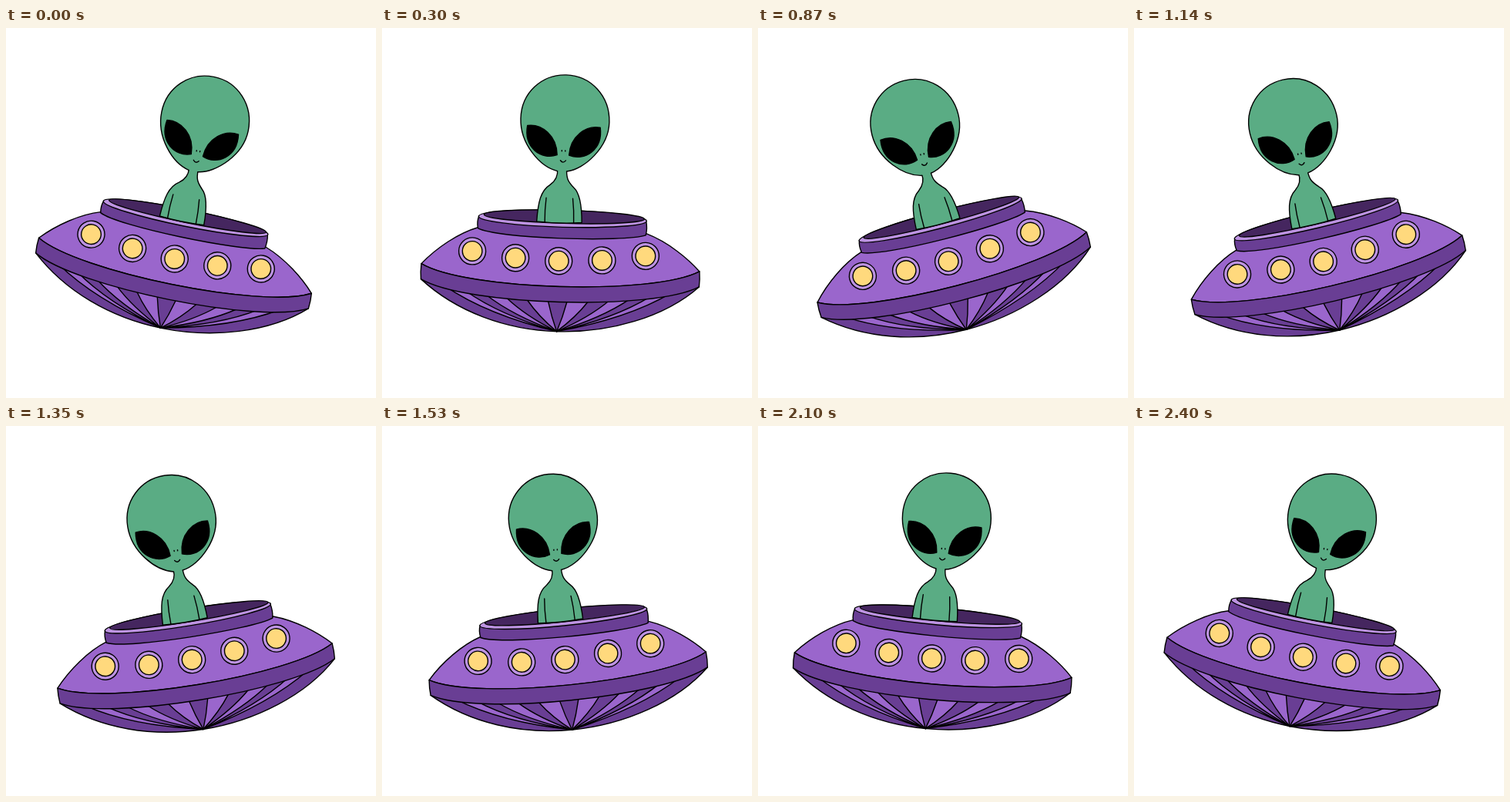
These frames come from a looping animation (480 px wide and 480 px high, 2.43 s). An HTML page:

```html
<!DOCTYPE html>
<html lang="en">
<head>
<meta charset="utf-8">
<title>Rocking saucer</title>
<style>
  html, body { margin: 0; height: 100%; overflow: hidden; background: #fff; }
  svg { display: block; width: 100vw; height: 100vh; }
  #ship { stroke: #000; stroke-width: 1.4; stroke-linejoin: round; stroke-linecap: round; }
  .light { fill: #9a66cc; }
  .dark { fill: #693e94; }
  .pale { fill: #bd93e2; }
  .skin { fill: #5aac84; }
  .line { fill: none; }
</style>
</head>
<body>
<svg viewBox="0 0 480 480">
  <g id="ship">
    <!-- underside -->
    <path class="dark" d="M53 331C100 372 165 394 232 394S370 372 414 331Z"/>
    <g id="stripes" class="light"></g>

    <!-- hull -->
    <path class="light" d="M125 262C100 270 72 290 53 311C112 344 355 344 414 311C398 294 372 274 344 264Z"/>
    <path class="dark" d="M53 311C112 344 355 344 414 311Q415 321 414 331C355 364 112 364 53 331Q52 321 53 311Z"/>
    <g id="windows"></g>

    <!-- collar and opening -->
    <path class="dark" d="M126 247C124 252 124 258 125 263C150 276 315 276 343 266Q345 257 343 248Z"/>
    <ellipse class="pale" cx="234.500" cy="247.500" rx="109" ry="11"/>
    <ellipse fill="#45265f" cx="236.500" cy="245" rx="104" ry="8.500"/>

    <!-- alien -->
    <path class="skin" d="M226 184C227 192 225 198 217 204C205 212 202 227 201 252Q230 254.500 259.500 252C259 230 256 214 248 207C240 199 238 195 238 184Z"/>
    <path class="line" d="M212.500 221Q211 236 211.500 252.500M247 221Q249 236 249 252.500"/>
    <path class="skin" d="M226 186C203 181 176.500 152 176.500 119C176.500 86 202 61 234 61S291.500 87 291.500 121C291.500 153 261 183 238 186"/>
    <path id="eye" d="M185.500 128C204 125 224 140 225 165C205 173 181 157 185.500 128Z"/>
    <use href="#eye" transform="matrix(-1 0 0 1 465.500 0)"/>
    <path class="line" d="M231 159v1M235.500 159v1M229.500 172Q233 176.500 236.500 172"/>
  </g>
</svg>
<script>
const ship = document.getElementById("ship");
const MID = 231, TIP = 394;

// Stripe edges are evenly spaced along the rim and meet at the tip.
const edge = (side, k) => {
  const x = MID + side * (12 + 27 * k), u = (x - 53) / 361;
  return {
    rim: `${x} ${331 + 100 * u * (1 - u)}`,
    bend: `${x + (MID - x) * 0.38} 375`
  };
};

let stripes = "", windows = "";
for (const side of [-1, 1]) {
  for (let k = 0; k < 6; k += 2) {
    const a = edge(side, k), b = edge(side, k + 1);
    stripes += `<path d="M${a.rim}Q${a.bend} ${MID} ${TIP}Q${b.bend} ${b.rim}"/>`;
  }
}
for (let i = -2; i <= 2; i++) {
  const centre = `cx="${MID + 56.2 * i}" cy="${302.5 - 2.4 * i * i}"`;
  windows += `<circle class="pale" ${centre} r="17.500"/><circle fill="#ffd97d" ${centre} r="12.800"/>`;
}
document.getElementById("stripes").innerHTML = stripes;
document.getElementById("windows").innerHTML = windows;

// Rocking: a fast swing left, a soft turn, then a slower steady swing back.
const LOOP = 2430, STEP = 30, TURN_START = 660, TURN_END = 1140;
const HIGH = 11.5, LEFT = -10.2, LOW = -13.3;
const fall = (LEFT - HIGH) / TURN_START;
const rise = (HIGH - LOW) / (LOOP - TURN_END);

function angleAt(t) {
  if (t < TURN_START) return HIGH + fall * t;
  if (t > TURN_END) return LOW + rise * (t - TURN_END);
  const h = TURN_END - TURN_START, s = (t - TURN_START) / h, r = 1 - s;
  return r * r * (1 + 2 * s) * LEFT + s * s * (1 + 2 * r) * LOW + h * s * r * (r * fall - s * rise);
}

function draw(now) {
  const t = Math.floor((now % LOOP) / STEP) * STEP;
  ship.setAttribute("transform", `rotate(${angleAt(t)} 240 240)`);
  requestAnimationFrame(draw);
}
draw(performance.now());
</script>
</body>
</html>
```
